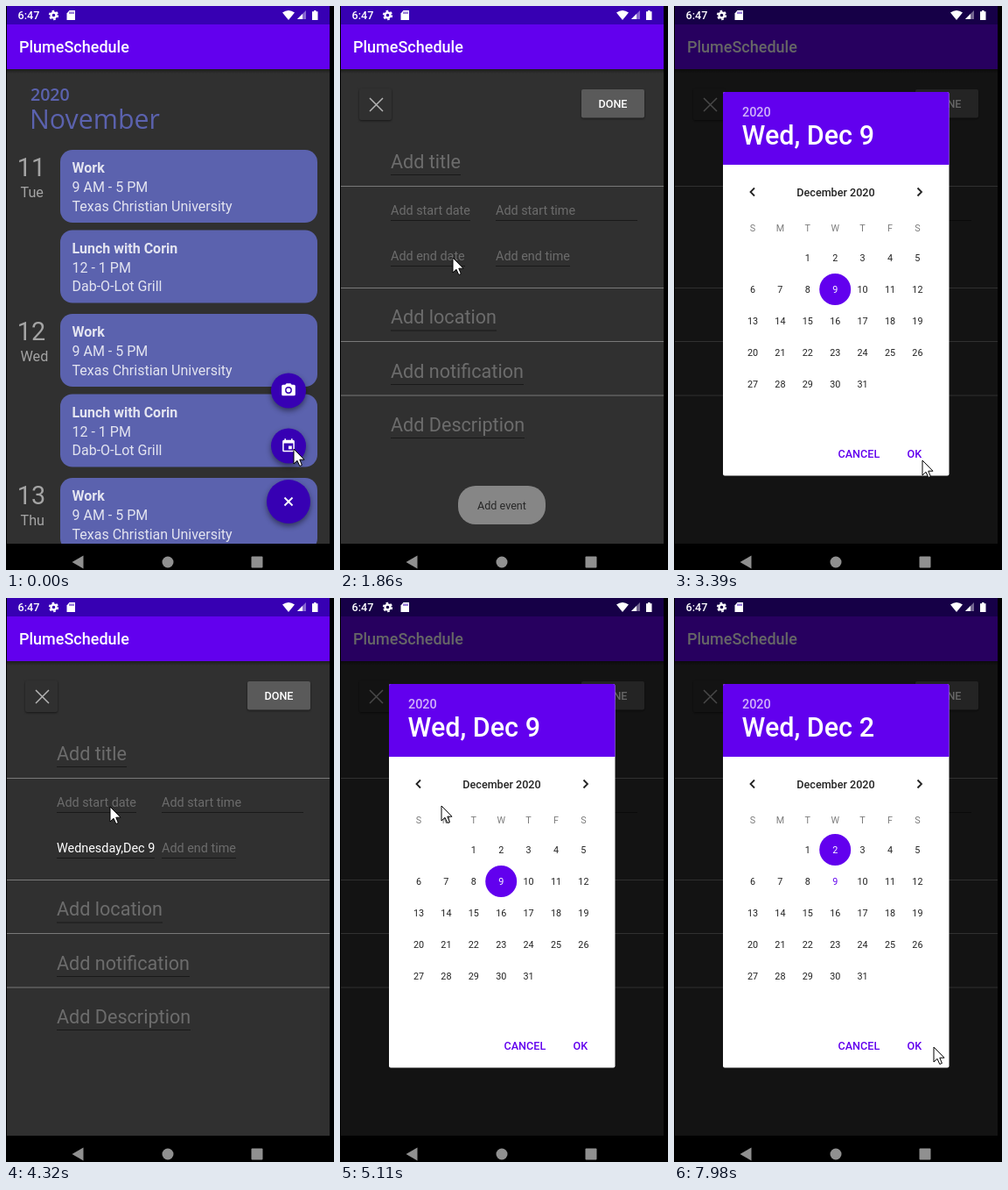
Animation of 375 by 643 pixels, one loop 8000 ms. Source, as an HTML page:

```html
<!DOCTYPE html>
<html lang="en">
<head>
<meta charset="utf-8">
<title>Calendar app</title>
<style>
html, body { margin: 0; width: 100%; height: 100%; overflow: hidden; background: #000; }
svg { display: block; width: 100%; height: 100%; font-family: Roboto, sans-serif; }
.b { font-weight: 700; }
.m { font-weight: 500; }
.c { text-anchor: middle; }
.fab { fill: #3700b3; filter: drop-shadow(0 3px 3px #0007); }
</style>
</head>
<body>
<svg id="stage" viewBox="0 0 375 643"></svg>
<script>
const LOOP = 8000;
const APP = 'PlumeSchedule';

const TICKS = [0, 520, 670, 790, 910,
  1450, 1580, 1710, 1860, 1980, 2110,
  2380, 2520, 2670, 2810, 2960, 3100, 3250, 3390,
  3660, 3800, 3920, 4060, 4190, 4320, 4480, 4620,
  4740, 4860, 4980, 5110, 5270, 5450, 5650, 5800,
  6080, 6210, 6350, 6480, 6620, 6750, 6890, 7020,
  7150, 7290, 7420, 7560, 7700, 7840, 7980];

// Pointer path: time, x, y
const PATH = [[1320, 329, 505], [1860, 129, 287], [2600, 129, 287], [3390, 284, 518],
  [3790, 284, 518], [4320, 119, 238], [4620, 116, 237], [5110, 116, 237],
  [5650, 128, 369], [5800, 128, 375], [5950, 128, 375], [6350, 120, 350],
  [7020, 175, 290], [7290, 175, 290], [7700, 344, 603], [7980, 297, 512]];

const text = (x, y, size, fill, str, attrs = '') =>
  `<text x="${x}" y="${y}" font-size="${size}" fill="${fill}" ${attrs}>${str}</text>`;
const rect = (x, y, w, h, fill, attrs = '') =>
  `<rect x="${x}" y="${y}" width="${w}" height="${h}" fill="${fill}" ${attrs}/>`;
const path = (d, attrs) => `<path d="${d}" ${attrs}/>`;
const circle = (x, y, r, attrs) => `<circle cx="${x}" cy="${y}" r="${r}" ${attrs}/>`;

const page = body => rect(1, 0, 369, 613, '#303030') + body +
  rect(1, 0, 369, 21, '#3700b3') + rect(1, 21, 369, 51, '#6200ee') +
  rect(1, 72, 369, 5, 'url(#shade)') + text(15, 53, 18, '#fff', APP, 'class="m"');

// Agenda list
const EVENTS = [['Work', '9 AM - 5 PM', 'Texas Christian University'],
  ['Lunch with Corin', '12 - 1 PM', 'Dab-O-Lot Grill']];
const card = (y, [title, hours, place]) => rect(62, y, 294, 83, '#5b62ae', 'rx="14"') +
  text(75.5, y + 26, 16, '#e3e4f0', title, 'class="b"') +
  text(75.5, y + 48, 16, '#e3e4f0', hours) + text(75.5, y + 69.5, 16, '#e3e4f0', place);
const day = (y, date, name) => text(12.8, y + 29.5, 28.8, '#a4a4a4', date) +
  text(16.5, y + 54, 16.2, '#a4a4a4', name) + card(y, EVENTS[0]) + card(y + 91.5, EVENTS[1]);
const icon = (x, y, k, d) =>
  path(d, `fill="#fff" fill-rule="evenodd" transform="translate(${x} ${y}) scale(${k}) translate(-12 -12)"`);
const agenda = page(
  text(28, 108, 19.6, '#5b62ae', '2020', 'font-family="Open Sans, sans-serif" font-weight="600"') +
  text(27, 140, 30.3, '#5b62ae', 'November', 'font-family="Open Sans, sans-serif"') +
  day(164, 11, 'Tue') + day(351, 12, 'Wed') + day(538, 13, 'Thu') +
  circle(323, 438.5, 20, 'class="fab"') + circle(323, 501.5, 20, 'class="fab"') +
  circle(323, 565, 25, 'class="fab"') +
  icon(323, 438, .78, 'M9 2L7.2 4H4q-2 0-2 2v12q0 2 2 2h16q2 0 2-2V6q0-2-2-2h-3.2L15 2zM12 7a5 5 0 1 1 0 10a5 5 0 1 1 0-10zM12 8.8a3.2 3.2 0 1 0 0 6.4a3.2 3.2 0 1 0 0-6.4z') +
  icon(323, 501.5, .76, 'M17 12h-5v5h5zM16 1v2H8V1H6v2H5Q3 3 3 5v14q0 2 2 2h14q2 0 2-2V5q0-2-2-2h-1V1zM19 19H5V8h14z') +
  path('M318.5 560.5l9 9m0-9l-9 9', 'stroke="#fff" stroke-width="1.8"'));

// Event form
const HINT = '#6c6c6c';
const field = (x, y, end, size, str, id = '') =>
  text(x, y, size, HINT, str, id && `id="${id}"`) +
  path(`M${x} ${y + (size > 20 ? 8 : 6.5)}H${end}`, `stroke="#191919" ${id && `id="${id}Line"`}`);
const form = page(
  rect(22, 94, 37, 36, '#303030', 'rx="2" style="filter:drop-shadow(0 1px 1px #0008)"') +
  path('M34 105l15 15m0-15l-15 15', 'stroke="#b4b4b4" stroke-width="1.5"') +
  rect(276, 95, 72, 32.5, '#5a5a5a', 'rx="2" style="filter:drop-shadow(0 1px 1px #0008)"') +
  text(312, 116, 12.6, '#fff', 'DONE', 'class="m c"') +
  field(58, 184.5, 138, 21.6, 'Add title') +
  field(58, 238, 149, 14.4, 'Add start date') + field(178, 238, 340, 14.4, 'Add start time') +
  field(58, 290, 143, 14.4, 'Add end date', 'endDate') + field(178, 290, 263, 14.4, 'Add end time') +
  field(58, 362, 179, 21.6, 'Add location') + field(58, 423.5, 210, 21.6, 'Add notification') +
  field(58, 484.5, 211, 21.6, 'Add Description') +
  [205.5, 321.5, 382.5, 444].map(y => path(`M1 ${y}H370`, 'stroke="#797979" stroke-width="1.2"')).join(''));

// Date picker
const cell = i => [90 + 31.4 * (i % 7), 287 + 36 * Math.floor(i / 7)];
const days = Array.from({ length: 31 }, (_, n) => {
  const [x, y] = cell(n + 2);
  return text(x, y + 4, 10.8, '#222', n + 1, `class="c" id="day${n + 1}"`);
}).join('');
const picker = rect(56, 98, 258.5, 437.5, '#fff', 'rx="2"') +
  path('M56 181V100q0-2 2-2h254.500q2 0 2 2V181z', 'fill="#6200ee"') +
  text(78, 126, 14.4, '#fff', '2020', 'class="m" opacity=".7"') +
  text(77.500, 157.5, 30.5, '#fff', '', 'class="m" id="chosen"') +
  text(185, 216.5, 12.6, '#222', 'December 2020', 'class="m c"') +
  path('M92 207.500l-4.500 4.500l4.500 4.500M278.500 207.500l4.500 4.500l-4.500 4.500',
    'fill="none" stroke="#222" stroke-width="1.8"') +
  [...'SMTWTFS'].map((s, i) => text(cell(i)[0], 257, 10.8, '#7c7c7c', s, 'class="c"')).join('') +
  circle(0, 0, 18, 'fill="#6200ee" id="mark"') + days +
  text(187.5, 515, 12.6, '#6200ee', 'CANCEL', 'class="m"') +
  text(266.5, 515, 12.6, '#6200ee', 'OK', 'class="m"');

const status = text(13.5, 15, 12.6, '#fff', '6:47', 'class="m"') +
  circle(54.5, 10.5, 3, 'fill="none" stroke="#fff" stroke-width="2.4"') +
  circle(54.5, 10.5, 4.8, 'fill="none" stroke="#fff" stroke-width="1.8" stroke-dasharray="2.600 2.426"') +
  path('M72.500 5H79V16H69.500V8.500z', 'fill="#fff"') +
  path('M73 6.500v2.500m2-2.500v2.500m2-2.500v2.500', 'stroke="#3700b3"') +
  path('M323 16L316 7.500Q323 2.500 330 7.500z', 'fill="#fff"') +
  path('M333 15H343V5z', 'fill="#fff" opacity=".4"') + path('M333 15H339V9z', 'fill="#fff"') +
  path('M350 6.200h2V5h2.500v1.200h2V16H350z', 'fill="#fff"');

const nav = path('M75.500 634L88.500 626.500V641.500z', 'fill="#909090"') +
  circle(185, 634, 6.5, 'fill="#909090"') + rect(280.500, 627.5, 13, 13, '#909090', 'rx="1"');

stage.innerHTML = `<defs>
  <linearGradient id="shade" x2="0" y2="1"><stop stop-opacity=".4"/><stop offset="1" stop-opacity="0"/></linearGradient>
  <clipPath id="reveal"><rect id="revealBox" x="1" width="369" height="613"/></clipPath>
  <clipPath id="body"><rect x="1" width="369" height="613"/></clipPath></defs>` +
  nav +
  `<g clip-path="url(#body)"><g id="agenda">${agenda}</g>${rect(1, 0, 369, 613, '#000', 'id="fade"')}</g>` +
  `<g id="form" clip-path="url(#reveal)">${form}</g>` +
  `<g id="toast">${rect(135, 547, 100, 44, '#d0d0d0', 'rx="20"')}${text(185, 574, 12.6, '#222', 'Add event', 'class="c"')}</g>` +
  rect(1, 0, 369, 613, '#000', 'id="dim"') + `<g id="picker">${picker}</g>` + status +
  path('M0 0V17L4 13.300L6.800 19.500L9.400 18.400L6.800 12.200H12z',
    'id="pointer" fill="#fff" stroke="#000" stroke-width="1"');

const el = id => document.getElementById(id);
const set = (id, attrs) => {
  for (const k in attrs) el(id).setAttribute(k, attrs[k]);
};
const ramp = (t, a, b) => Math.min(1, Math.max(0, (t - a) / (b - a)));
const mix = (a, b, u) => a + (b - a) * u;

function pointerAt(t) {
  const i = PATH.findIndex(p => p[0] > t);
  if (i === 0) return PATH[0].slice(1);
  if (i < 0) return PATH[PATH.length - 1].slice(1);
  const [a, b] = [PATH[i - 1], PATH[i]];
  const u = ramp(t, a[0], b[0]), e = u * u * (3 - 2 * u);
  return [mix(a[1], b[1], e), mix(a[2], b[2], e)];
}

function draw(time) {
  const t = TICKS.findLast(k => k <= time);

  const p = 1 - (1 - ramp(t, 520, 910)) ** 2;
  set('agenda', { transform: `translate(0 ${-12.5 * p})` });
  set('fade', { opacity: .16 * p });
  set('form', { transform: `translate(0 ${26 * (1 - p)})`, display: p ? 'inline' : 'none' });
  set('revealBox', { y: 150 * (1 - p) });
  set('toast', { opacity: ramp(t, 370, 670) * (t < 520 ? 0 : 1) * (1 - ramp(t, 1715, 2030)) });

  const filled = t >= 3660;
  el('endDate').textContent = filled ? 'Wednesday,Dec 9' : 'Add end date';
  set('endDate', { fill: filled ? '#fff' : HINT });
  set('endDateLine', { d: `M58 296.500H${filled ? 170 : 143}` });

  const open = ramp(t, 2310, 2600) - ramp(t, 3600, 3860) + ramp(t, 4670, 4960);
  const k = mix(.92, 1, open);
  set('dim', { opacity: .6 * open });
  set('picker', { opacity: open, transform: `translate(185 317) scale(${k}) translate(-185 -317)` });

  const chosen = t >= 7150 ? 2 : 9;
  const [x, y] = cell(chosen + 1);
  el('chosen').textContent = 'Wed, Dec ' + chosen;
  set('mark', { cx: x, cy: y });
  set('day2', { fill: chosen === 2 ? '#fff' : '#222' });
  set('day9', { fill: chosen === 9 ? '#fff' : '#6200ee' });

  set('pointer', { transform: `translate(${pointerAt(t)})` });
}

function loop() {
  draw(performance.now() % LOOP);
  requestAnimationFrame(loop);
}
loop();
</script>
</body>
</html>
```
